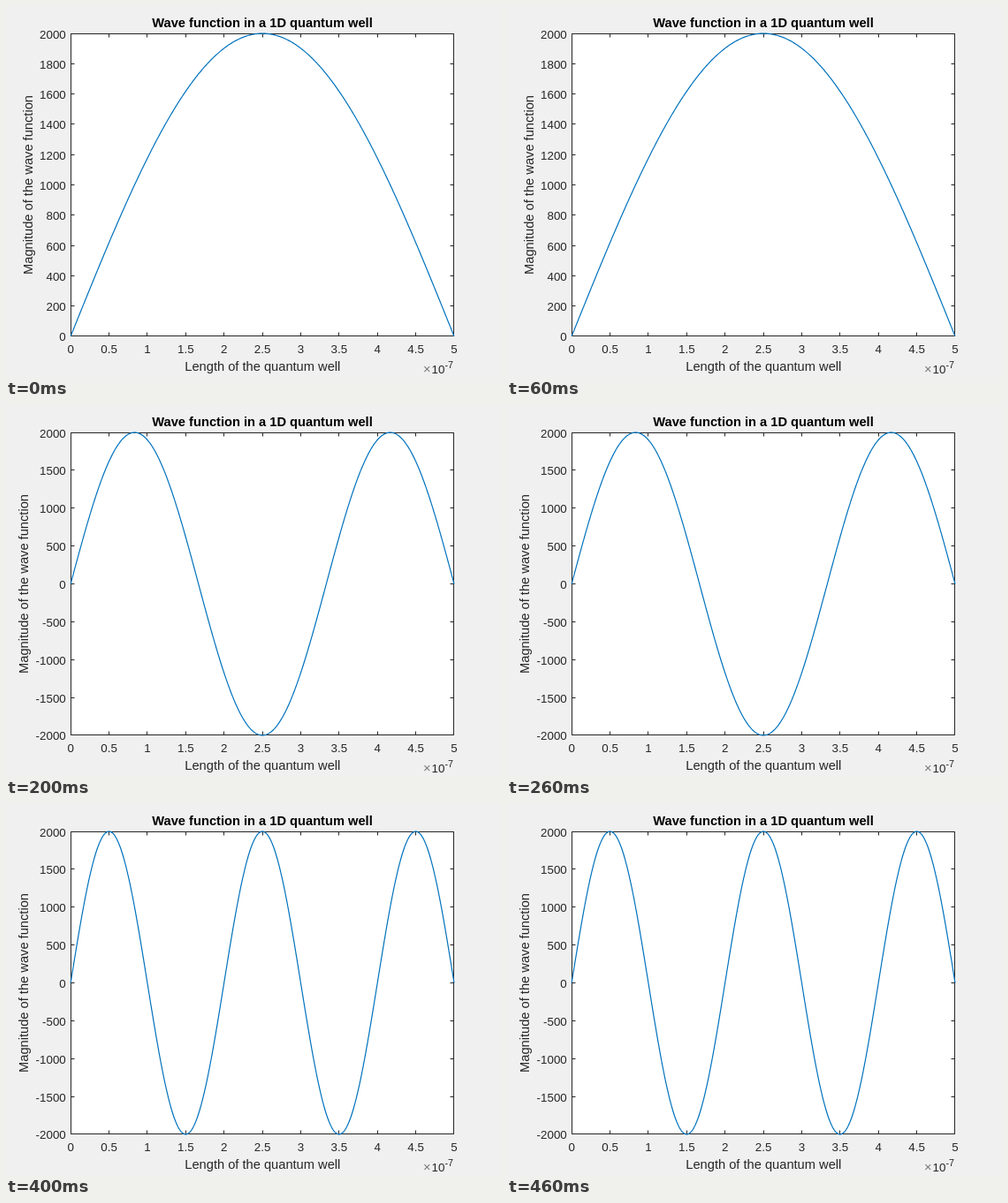
These frames come from a looping animation (560x420 px, 500 ms). An HTML page with a canvas:

```html
<!DOCTYPE html>
<html lang="en">
<head>
<meta charset="utf-8">
<title>Wave function in a 1D quantum well</title>
<style>
html, body { margin: 0; overflow: hidden; background: #f0f0f0; }
canvas { display: block; }
</style>
</head>
<body>
<canvas id="stage" width="560" height="420"></canvas>
<script>
const ctx = document.getElementById('stage').getContext('2d');
const LEFT = 73.15, RIGHT = 506.95, TOP = 31.1, BOTTOM = 373.9;
const WIDTH = RIGHT - LEFT, HEIGHT = BOTTOM - TOP;
const TICK = 4, STEP_MS = 100, STATES = 5, MAX = 2000;
const INK = '#262626';

const snap = v => Math.floor(v) + 0.5; // centre of the pixel
const yOf = (v, min) => BOTTOM - HEIGHT * (v - min) / (MAX - min);

function text(str, x, y, size, align = 'center', color = INK, weight = '') {
  ctx.font = `${weight} ${size}px Arial, "Liberation Sans", sans-serif`;
  ctx.textAlign = align;
  ctx.fillStyle = color;
  ctx.fillText(str, x, y);
}

function line(x1, y1, x2, y2) {
  ctx.moveTo(x1, y1);
  ctx.lineTo(x2, y2);
}

function drawAxes(min, step) {
  const left = snap(LEFT), right = snap(RIGHT);
  const top = snap(TOP), bottom = snap(BOTTOM);
  ctx.strokeStyle = INK;
  ctx.lineWidth = 1;
  ctx.beginPath();
  ctx.rect(left, top, right - left, bottom - top);
  ctx.fillStyle = '#fff';
  ctx.fill();
  for (let i = 0; i <= 10; i++) {
    const x = LEFT + WIDTH * i / 10, px = snap(x);
    line(px, bottom, px, bottom - TICK);
    line(px, top, px, top + TICK);
    text(i / 2, x, 393, 13.33);
  }
  for (let v = min; v <= MAX; v += step) {
    const y = snap(yOf(v, min));
    line(left, y, left + TICK, y);
    line(right, y, right - TICK, y);
    text(v, 67.7, y + 5.5, 13.33, 'right');
  }
  ctx.stroke();
}

function drawLabels(yLabelX) {
  text('Wave function in a 1D quantum well', 290, 24, 14.67, 'center', '#000', 'bold');
  text('Length of the quantum well', 290.3, 413, 14.67);
  text('×', 472, 416, 14.67, 'left', '#777');
  text('10', 481.5, 416, 13.33, 'left');
  text('-7', 496.5, 410, 10.67, 'left');
  ctx.save();
  ctx.translate(yLabelX, 202.5);
  ctx.rotate(-Math.PI / 2);
  text('Magnitude of the wave function', 0, 0, 14.67);
  ctx.restore();
}

function drawWave(n, min) {
  ctx.strokeStyle = '#0072bd';
  ctx.lineWidth = 1.2;
  ctx.beginPath();
  for (let x = 0; x <= WIDTH; x += WIDTH / 500) {
    const v = MAX * Math.sin(n * Math.PI * x / WIDTH);
    ctx.lineTo(LEFT + x, yOf(v, min));
  }
  ctx.stroke();
}

function draw() {
  const n = 1 + Math.floor(performance.now() / STEP_MS) % STATES;
  const min = n === 1 ? 0 : -MAX;
  ctx.clearRect(0, 0, 560, 420);
  drawAxes(min, n === 1 ? 200 : 500);
  drawLabels(n === 1 ? 30 : 25);
  drawWave(n, min);
  requestAnimationFrame(draw);
}
draw();
</script>
</body>
</html>
```
